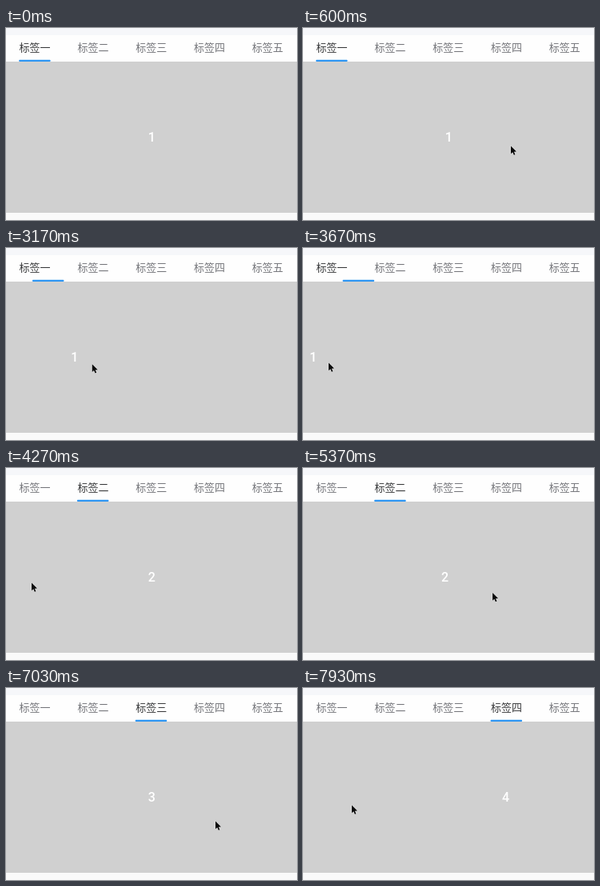
Animation, 364 px wide and 240 px high, one loop 8 s. Source, as an HTML page with a canvas:

```html
<!DOCTYPE html>
<html lang="zh">
<head>
<meta charset="utf-8">
<style>
html, body { margin: 0; width: 100%; height: 100%; overflow: hidden; background: #f7f8fa; }
canvas { display: block; width: 364px; height: 240px; }
</style>
</head>
<body>
<canvas id="stage"></canvas>
<script>
const W = 364, H = 240, LOOP = 8000;
const TAB = W / 5, BAR_WIDTH = 39.6;
const SETTLE = 290, BAR_LAG = 55, BAR_SNAP = 90;
const LABELS = ['一', '二', '三', '四', '五'].map(n => '标签' + n);

const clamp = v => Math.max(0, Math.min(1, v));
const mix = (a, b, k) => a + (b - a) * k;
const linear = k => k;
const easeIn = k => k ** 1.5;
const easeOut = k => 1 - (1 - k) ** 2;
const easeInOut = k => (1 - Math.cos(Math.PI * k)) / 2;
const progress = (t, { start, end, ease }) => ease(clamp((t - start) / (end - start)));

// Pages are pulled part of the way, then settle after release
const DRAGS = [
  { start: 2530, end: 3710, pulled: 170, ease: easeInOut },
  { start: 5280, end: 6270, pulled: 167, ease: easeIn },
  { start: 7200, end: 7815, pulled: 166, ease: easeInOut }
];

// Pointer moves run one after another; sag bends the path downwards
const ENTRY = { x: 360, y: 26 };
const MOVES = [
  { start: 100, end: 600, x: 260, y: 147, sag: 22, ease: easeOut },
  { start: 1270, end: 1500, x: 257, y: 143, sag: 0, ease: easeInOut },
  { start: 2530, end: 3588, x: 32, y: 143, sag: 2, ease: easeInOut },
  { start: 4500, end: 5130, x: 256, y: 156, sag: 18, ease: easeInOut },
  { start: 5290, end: 6245, x: 33, y: 150, sag: 0, ease: linear },
  { start: 6480, end: 7030, x: 262, y: 166, sag: 10, ease: easeInOut },
  { start: 7180, end: 7850, x: 61, y: 146, sag: 0, ease: easeInOut }
];

const canvas = document.getElementById('stage');
const ctx = canvas.getContext('2d');
const ratio = window.devicePixelRatio || 1;
canvas.width = W * ratio;
canvas.height = H * ratio;
ctx.scale(ratio, ratio);

// Sum of page turns, each pulled with a lag and finished after release
function turned(t, lag, finish) {
  return DRAGS.reduce((sum, drag) => {
    const pulled = progress(Math.min(t, drag.end) - lag, drag) * drag.pulled / W;
    return sum + mix(pulled, 1, easeOut(clamp((t - drag.end) / finish)));
  }, 0);
}

function pointerAt(t) {
  return MOVES.reduce((from, move) => {
    const k = progress(t, move);
    return {
      x: mix(from.x, move.x, k),
      y: mix(from.y, move.y, k) + move.sag * Math.sin(Math.PI * k)
    };
  }, ENTRY);
}

function band(color, y, h) {
  ctx.fillStyle = color;
  ctx.fillRect(0, y, W, h);
}

function drawTabs(t) {
  const active = DRAGS.filter(drag => t >= drag.end).length;
  ctx.textAlign = 'center';
  LABELS.forEach((label, i) => {
    const on = i === active;
    ctx.font = (on ? 500 : 400) + ' 13px "Noto Sans CJK SC", "Noto Sans CJK", sans-serif';
    ctx.fillStyle = on ? '#37383a' : '#74757a';
    ctx.fillText(label, TAB * (i + 0.5) - 0.3, 29.4);
  });
  const center = TAB * (turned(t, BAR_LAG, BAR_SNAP) + 0.5) - 0.5;
  ctx.fillStyle = '#2f96f3';
  ctx.beginPath();
  ctx.roundRect(center - BAR_WIDTH / 2, 39.8, BAR_WIDTH, 2.2, 1);
  ctx.fill();
}

function drawPages(t) {
  const scroll = W * turned(t, 0, SETTLE);
  ctx.font = '500 16px Roboto, sans-serif';
  ctx.fillStyle = '#fff';
  LABELS.forEach((_, i) => ctx.fillText(i + 1, W * (i + 0.5) - scroll + 0.3, 142));
}

function drawPointer(t) {
  if (t < MOVES[0].start) return;
  const { x, y } = pointerAt(t);
  ctx.save();
  ctx.translate(x, y + 0.5);
  ctx.scale(0.85, 0.85);
  const arrow = new Path2D('M0 0V11.4L2.6 9L4.5 13.3L6.4 12.5L4.6 8.4L8.2 8.2Z');
  ctx.lineJoin = 'round';
  ctx.strokeStyle = 'rgba(255,255,255,0.5)';
  ctx.stroke(arrow);
  ctx.fillStyle = '#0a0a0a';
  ctx.fill(arrow);
  ctx.restore();
}

function draw(t) {
  band('#f6f7fa', 0, 9);
  band('#fefefe', 9, 33);
  band('#d0d0d0', 42, 189);
  band('#fafafa', 231, 9);
  drawTabs(t);
  drawPages(t);
  drawPointer(t);
}

function tick() {
  draw(performance.now() % LOOP);
  requestAnimationFrame(tick);
}
tick();
</script>
</body>
</html>
```
